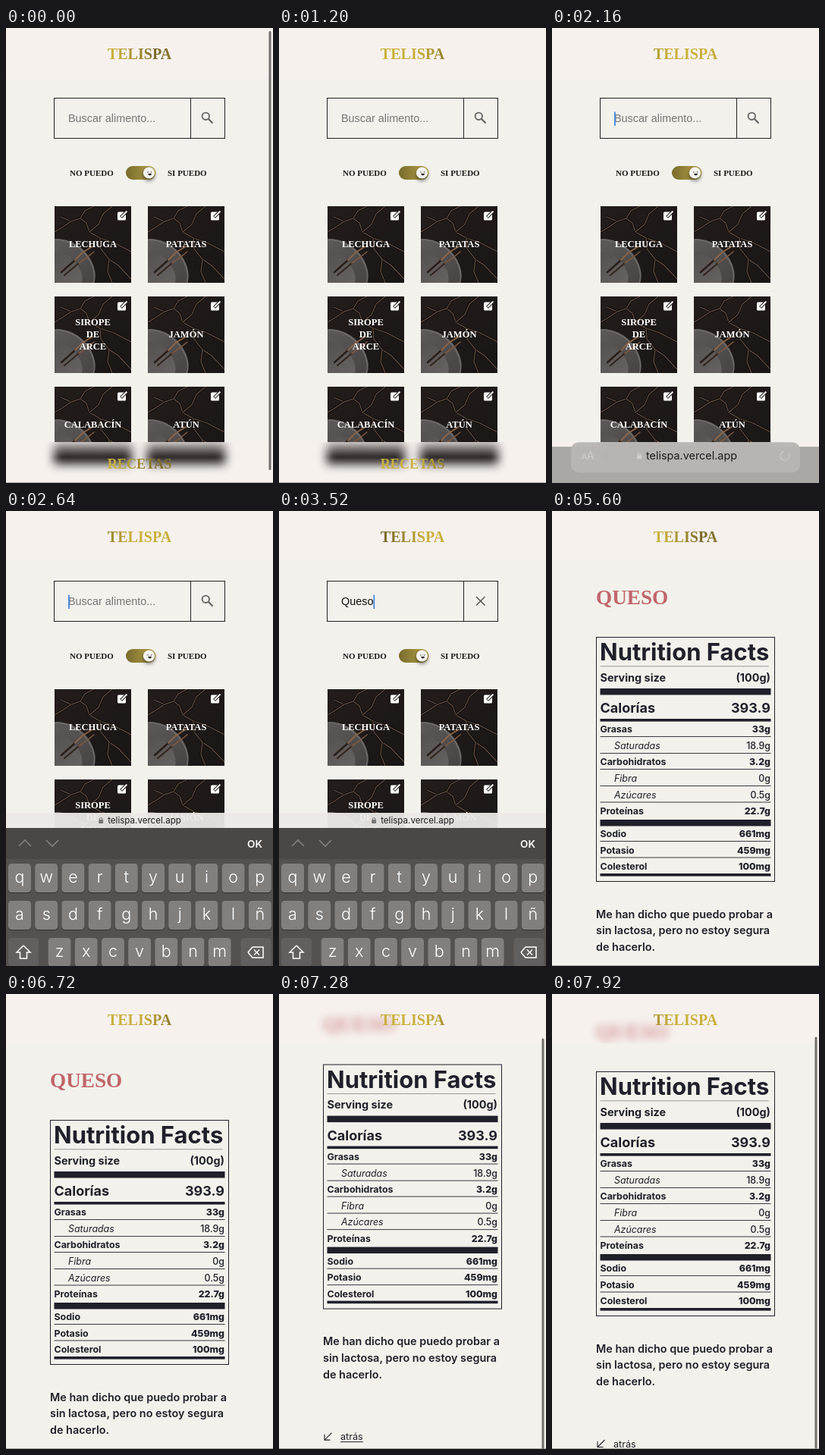
Recreate the animation shown at these times as an HTML page with a canvas. Size 352 by 600 pixels, loop 8 s.

```html
<!DOCTYPE html>
<html lang="es">
<head>
<meta charset="utf-8">
<title>Buscar alimento</title>
<style>
html, body { margin: 0; width: 100%; height: 100%; overflow: hidden; background: #f2f1eb; }
canvas { display: block; width: 352px; height: 600px; }
</style>
</head>
<body>
<canvas id="stage"></canvas>
<script>
const W = 352, H = 600, LOOP = 8000;
const PAPER = '#f2f1eb', HEAD = '#f6f1ed', INK = '#20202b';
const SERIF = '"Liberation Serif", serif';
const SANS = '"Liberation Sans", Arial, sans-serif';
const INTER = 'Inter, sans-serif';
const BRAND = 'TELISPA', SITE = 'telispa.vercel.app';

const canvas = document.getElementById('stage');
const ctx = canvas.getContext('2d');
const dpr = window.devicePixelRatio || 1;
canvas.width = W * dpr;
canvas.height = H * dpr;

const clamp = (v, a = 0, b = 1) => Math.min(b, Math.max(a, v));
const ramp = (t, a, b) => clamp((t - a) / (b - a));
const mix = (a, b, p) => a + (b - a) * p;
const smooth = p => p * p * (3 - 2 * p);
const easeOut = p => 1 - (1 - p) ** 3;

function rect(x, y, w, h, color) {
  ctx.fillStyle = color;
  ctx.fillRect(x, y, w, h);
}

function round(x, y, w, h, r, color) {
  ctx.fillStyle = color;
  ctx.beginPath();
  ctx.roundRect(x, y, w, h, r);
  ctx.fill();
}

function disc(x, y, r, color) {
  ctx.fillStyle = color;
  ctx.beginPath();
  ctx.arc(x, y, r, 0, Math.PI * 2);
  ctx.fill();
}

function oval(x, y, rx, ry, turn, color) {
  ctx.fillStyle = color;
  ctx.beginPath();
  ctx.ellipse(x, y, rx, ry, turn, 0, Math.PI * 2);
  ctx.fill();
}

function line(points, color, width = 1) {
  ctx.strokeStyle = color;
  ctx.lineWidth = width;
  ctx.beginPath();
  for (let i = 0; i < points.length; i += 2) ctx.lineTo(points[i], points[i + 1]);
  ctx.stroke();
}

function text(str, x, y, font, color, align = 'left') {
  ctx.font = font;
  ctx.fillStyle = color;
  ctx.textAlign = align;
  ctx.fillText(str, x, y);
}

function gradient(x0, y0, x1, y1, from, to) {
  const g = ctx.createLinearGradient(x0, y0, x1, y1);
  g.addColorStop(0, from);
  g.addColorStop(1, to);
  return g;
}

function group(draw, alpha = 1) {
  ctx.save();
  ctx.globalAlpha *= alpha;
  draw();
  ctx.restore();
}

function clip(x, y, w, h) {
  ctx.beginPath();
  ctx.rect(x, y, w, h);
  ctx.clip();
}

// Gold band that travels across the lettering
function gold(u) {
  const d = ramp(Math.abs((u - Math.floor(u)) - 0.5) * 2, 0.35, 1);
  return `rgb(${mix(201, 117, d)},${mix(177, 100, d)},${mix(62, 42, d)})`;
}

function goldText(str, y, size, t) {
  const fill = ctx.createLinearGradient(133, 0, 219, 0);
  for (let i = 0; i <= 8; i++) fill.addColorStop(i / 8, gold(0.6 - t / 5600 + i / 16));
  text(str, 176, y, `bold ${size}px ${SERIF}`, fill, 'center');
}

function header() {
  rect(0, 0, W, 65, HEAD);
}

function editIcon(x, y) {
  round(x, y + 1.5, 11, 11, 1.5, '#fff');
  line([x + 4.5, y + 8.5, x + 12, y + 1], '#2b2525', 4);
  line([x + 5, y + 8, x + 12.4, y + 0.6], '#fff', 2);
}

const CRACKS = [
  [8, 14, 22, 20, 34, 16, 42, 22, 46, 34, 60, 42, 78, 48, 101, 60],
  [34, 16, 40, 6, 52, 0],
  [46, 34, 58, 24, 64, 10, 76, 0],
  [60, 42, 61, 56, 72, 70, 84, 78, 101, 96],
  [72, 70, 70, 86, 76, 101],
  [0, 34, 10, 28, 22, 20]
];

function tile(x, y, label) {
  group(() => {
    ctx.translate(x, y);
    clip(0, 0, 101, 101);
    rect(0, 0, 101, 101, gradient(0, 0, 101, 101, '#231d1b', '#1a1616'));
    for (const c of CRACKS) {
      line(c, '#0f0c0c', 3);
      line(c, '#655043', 1.2);
    }
    oval(14, 82, 44, 34, 0.75, '#6b6766');
    oval(13, 83, 43, 33, 0.75, gradient(0, 45, 40, 101, '#5d5958', '#4a4646'));
    oval(8, 88, 32, 24, 0.75, gradient(0, 65, 30, 101, '#565251', '#656160'));
    ctx.lineCap = 'round';
    line([9, 87, 27, 71], '#2a201b', 2.6);
    line([27, 71, 37, 61, 50, 53], '#8a6549', 1.8);
    line([13, 91, 32, 75], '#33271f', 2.2);
    line([32, 75, 42, 68, 52, 60], '#7b5941', 1.6);
  });
  editIcon(x + 83, y + 6);
  const rows = label.split(' ');
  rows.forEach((row, i) => text(row, x + 50.5, y + 54 + (i - (rows.length - 1) / 2) * 16.3,
    `bold 12.5px ${SERIF}`, '#fff', 'center'));
}

function toggle() {
  const font = `bold 11px ${SERIF}`;
  text('NO PUEDO', 84, 195, font, '#191919');
  text('SI PUEDO', 213, 195, font, '#191919');
  round(158, 182, 39.5, 18, 9, gradient(158, 0, 198, 0, '#786b2c', '#b9a64c'));
  group(() => {
    ctx.shadowColor = 'rgba(0,0,0,.5)';
    ctx.shadowBlur = 5 * dpr;
    ctx.shadowOffsetY = 3 * dpr;
    disc(188.5, 191, 7.6, '#f4f3f0');
  });
  disc(187, 190, 0.8, '#444');
  disc(191.5, 190, 0.8, '#444');
  ctx.fillStyle = '#222';
  ctx.beginPath();
  ctx.arc(189.6, 192, 2.4, 0, Math.PI);
  ctx.fill();
}

function searchBox(t) {
  ctx.strokeStyle = '#222';
  ctx.lineWidth = 1;
  ctx.strokeRect(63.5, 92.5, 225, 53);
  line([243.5, 92, 243.5, 146], '#222');
  const font = `14.4px ${SANS}`;
  const typed = t < 4240 ? 'Queso'.slice(0, clamp(Math.floor((t - 2590) / 170), 0, 5)) : '';
  text(typed || 'Buscar alimento...', 82, 124, font, typed ? '#111' : '#777');
  if (t > 2000 && t < 4240) {
    const x = 82 + (typed ? ctx.measureText(typed).width : 0);
    rect(x, 110.5, 1.8, 18.5, '#4a86e0');
  }
  if (typed) {
    line([260, 113, 271.5, 124.5], '#555', 1.5);
    line([271.5, 113, 260, 124.5], '#555', 1.5);
  } else {
    ctx.strokeStyle = '#666';
    ctx.lineWidth = 1.9;
    ctx.beginPath();
    ctx.arc(263.3, 116.3, 4.7, 0, Math.PI * 2);
    ctx.stroke();
    line([266.8, 119.8, 272.5, 125.5], '#666', 2.3);
  }
}

function footer(t) {
  group(() => {
    clip(0, 546, W, 54);
    rect(0, 546, W, 54, HEAD);
    ctx.filter = `blur(${6.5 * dpr}px)`;
    rect(63, 540, 103, 35, '#231e1e');
    rect(186, 540, 103, 35, '#231e1e');
    ctx.filter = 'none';
    rect(0, 546, W, 20, gradient(0, 546, 0, 566, 'rgba(246,241,237,.75)', 'rgba(246,241,237,0)'));
  });
  goldText('RECETAS', 581, 18.2, t);
}

function searchPage(t) {
  rect(0, 0, W, H, PAPER);
  header();
  goldText(BRAND, 41, 20.1, t);
  searchBox(t);
  toggle();
  ['LECHUGA', 'PATATAS', 'SIROPE DE ARCE', 'JAMÓN', 'CALABACÍN', 'ATÚN'].forEach((name, i) =>
    tile(64 + 123 * (i % 2), 235 + 119 * Math.floor(i / 2), name));
  footer(t);
  rect(0, 599, W, 1, '#a5a3a0');
  group(() => round(346.5, 4, 3, 579, 1.5, '#716e6c'), 1 - ramp(t, 400, 720));
}

function keyRow(letters, x, y) {
  [...letters].forEach((ch, i) => {
    const kx = x + 35.2 * i;
    round(kx, y + 1, 30, 38, 4.5, '#343230');
    round(kx, y, 30, 38, 4.5, '#827f7d');
    text(ch, kx + 15, y + 25, `300 21.5px ${INTER}`, '#fff', 'center');
  });
}

// The panel starts as plain frosted grey, then the keys come in
function keyboard(top, shown) {
  group(() => {
    ctx.translate(0, top);
    rect(0, 0, W, 190, 'rgba(168,165,163,.96)');
    ctx.globalAlpha = shown;
    rect(0, 0, W, 190, '#54514f');
    rect(0, 0, W, 41, '#4a4745');
    line([17, 24, 25, 16, 33, 24], '#83807e', 1.6);
    line([53, 16, 61, 24, 69, 16], '#83807e', 1.6);
    text('OK', 328, 25.5, `600 13.5px ${INTER}`, '#fff', 'center');
    keyRow('qwertyuiop', 3, 47);
    keyRow('asdfghjklñ', 3, 96);
    keyRow('zxcvbnm', 55.5, 145);
    round(3, 145, 40, 38, 4.5, '#62605e');
    round(309.5, 145, 40, 38, 4.5, '#62605e');
    line([23, 155, 14, 164, 18.5, 164, 18.5, 172, 27.5, 172, 27.5, 164, 32, 164, 23, 155], '#fff', 1.5);
    line([319, 164, 325, 157, 339, 157, 339, 171, 325, 171, 319, 164], '#fff', 1.5);
    line([327, 160.5, 334, 167.5], '#fff', 1.5);
    line([334, 160.5, 327, 167.5], '#fff', 1.5);
  });
}

function addressBar(top, q, alpha) {
  group(() => {
    const x = mix(25, 0, q), y = top + mix(-6, -20, q), h = mix(40, 20, q);
    const shade = mix(184, 236, q);
    round(x, y, W - 2 * x, h, 10 * (1 - q), `rgba(${shade},${shade - 3},${shade - 5},.94)`);
    const size = mix(14.4, 11.6, q), mid = y + h / 2 - mix(2, 0, q);
    const cx = mix(184, 182.5, q);
    ctx.font = `${size}px ${INTER}`;
    const left = cx - ctx.measureText(SITE).width / 2 - 9;
    text(SITE, cx, mid + size * 0.36, ctx.font, '#1d1c1c', 'center');
    const lock = mix(208, 119, q);
    const tone = `rgb(${lock},${lock},${lock})`;
    round(left - 3, mid - 1, 6, 5, 1, tone);
    ctx.strokeStyle = tone;
    ctx.lineWidth = 1.1;
    ctx.beginPath();
    ctx.arc(left, mid - 1.2, 2, Math.PI, 0);
    ctx.stroke();
    group(() => {
      text('A', 39, mid + 5, `11px ${INTER}`, '#d0cdcb');
      text('A', 46, mid + 5, `14px ${INTER}`, '#d0cdcb');
      ctx.strokeStyle = '#d0cdcb';
      ctx.beginPath();
      ctx.arc(307, mid, 6, -0.6, 4.6);
      ctx.stroke();
    }, 1 - q);
  }, alpha);
}

function browserPanel(t) {
  if (t < 2040 || t > 4830) return;
  const hide = easeOut(ramp(t, 4240, 4820));
  const show = smooth(ramp(t, 2040, 2400));
  const top = mix(mix(600, 418, show), 600, hide);
  const q = ramp(show, 0.27, 1);
  keyboard(top, clamp(q * 2));
  addressBar(top, q, clamp(show * 4) * (1 - ramp(hide, 0.3, 0.9)));
}

function pizza(t) {
  group(() => {
    ctx.translate(176, 297);
    ctx.rotate((59.5 + (t - 4640) * 0.36) * Math.PI / 180);
    ctx.lineJoin = 'round';
    const a = 0.36;
    const arc = (r, color, width, dash) => {
      ctx.strokeStyle = color;
      ctx.lineWidth = width;
      ctx.setLineDash(dash);
      ctx.beginPath();
      ctx.arc(0, 0, r, -a, a);
      ctx.stroke();
    };
    const slice = new Path2D();
    slice.moveTo(0, 0);
    slice.arc(0, 0, 70, -a, a);
    slice.closePath();
    ctx.fillStyle = '#e9dfa8';
    ctx.fill(slice);
    ctx.save();
    ctx.clip(slice);
    disc(41, 12, 10, '#a98061');
    disc(41, 12, 8.2, '#49302c');
    disc(36, -15, 8, '#a98061');
    disc(36, -15, 6.3, '#49302c');
    disc(7, 0, 8, '#5a3b32');
    arc(57, '#a98458', 2, [8, 4]);
    arc(66, '#d3b878', 7, [3, 1.5]);
    ctx.restore();
    ctx.strokeStyle = '#8f704f';
    ctx.lineWidth = 2;
    ctx.stroke(slice);
  });
}

// label, value, baseline, indented
const FACTS = [
  ['Grasas', '33g', 292, 0],
  ['Saturadas', '18.9g', 314, 1],
  ['Carbohidratos', '3.2g', 335, 0],
  ['Fibra', '0g', 357, 1],
  ['Azúcares', '0.5g', 378.5, 1],
  ['Proteínas', '22.7g', 400, 0],
  ['Sodio', '661mg', 430, 0],
  ['Potasio', '459mg', 451.5, 0],
  ['Colesterol', '100mg', 473, 0]
];

function pair(label, value, y, size, weight = 700) {
  text(label, 63.5, y, `700 ${size}px ${INTER}`, INK);
  text(value, 288, y, `${weight} ${size}px ${INTER}`, INK, 'right');
}

function factsLabel() {
  ctx.strokeStyle = INK;
  ctx.lineWidth = 1;
  ctx.strokeRect(58.5, 166.5, 235, 322);
  text('Nutrition Facts', 63, 197, `700 31px ${INTER}`, INK);
  rect(63.5, 204.5, 222, 0.7, '#77767a');
  pair('Serving size', '(100g)', 224.5, 14.4);
  rect(63.5, 234, 225, 8.5, INK);
  pair('Calorías', '393.9', 266, 18);
  rect(63.5, 274, 225, 3.6, INK);
  FACTS.forEach(([label, value, y, sub], i) => {
    if (sub) {
      text(label, 82, y, `italic 400 12.4px ${INTER}`, INK);
      text(value, 288, y, `500 12.4px ${INTER}`, INK, 'right');
    } else pair(label, value, y, 12.4, 800);
    if (i !== 5 && i !== 8) rect(63.5, y + 5, 225, 1, '#3a3a44');
  });
  rect(63.5, 407, 225, 8.5, INK);
  rect(63.5, 478, 225, 3.6, INK);
}

function scrollAt(t) {
  const push = 74.5 * easeOut(ramp(t, 7100, 7340));
  return push - 10.5 * smooth(ramp(t, 7340, 7720));
}

function foodPage(t) {
  const scroll = scrollAt(t);
  const name = () => text('QUESO', 58, 122.5, `bold 27.2px ${SERIF}`, '#c0666b');
  rect(0, 0, W, H, PAPER);
  group(() => {
    ctx.translate(0, -scroll);
    name();
    factsLabel();
    ['Me han dicho que puedo probar a', 'sin lactosa, pero no estoy segura', 'de hacerlo.'].forEach((row, i) =>
      text(row, 58, 536.5 + i * 21.7, `600 14.4px ${INTER}`, INK));
    text('atrás', 81, 661.5, `400 12.6px ${INTER}`, INK);
    rect(81, 663.5, ctx.measureText('atrás').width, 1, INK);
    line([69.5, 652, 60, 661.5], INK, 1.1);
    line([60, 654, 60, 661.5, 67.5, 661.5], INK, 1.1);
  });
  header();
  if (scroll > 30) group(() => {
    clip(0, 0, W, 65);
    ctx.filter = `blur(${5.5 * dpr}px)`;
    ctx.translate(0, -scroll);
    name();
  }, 0.7);
  goldText(BRAND, 41, 20.1, t);
  rect(0, 599, W, 1, '#a5a3a0');
  if (scroll > 0) {
    const top = scroll < 64 ? 4 + scroll * 0.82 : 56.5 + (scroll - 64) * 0.2;
    round(346.5, top, 3, Math.min(543, H - top), 1.5, '#716e6c');
  }
}

function frame(now) {
  const t = now % LOOP;
  ctx.setTransform(dpr, 0, 0, dpr, 0, 0);
  if (t < 4960) searchPage(t);
  else foodPage(t);
  const veil = 0.82 * ramp(t, 4400, 4640) + 0.18 * ramp(t, 4640, 4720) - ramp(t, 5000, 5280);
  if (veil > 0) {
    group(() => rect(0, 0, W, H, PAPER), veil);
    group(() => pizza(t), clamp(veil * 1.15));
  }
  browserPanel(t);
  requestAnimationFrame(frame);
}

requestAnimationFrame(frame);
</script>
</body>
</html>
```
